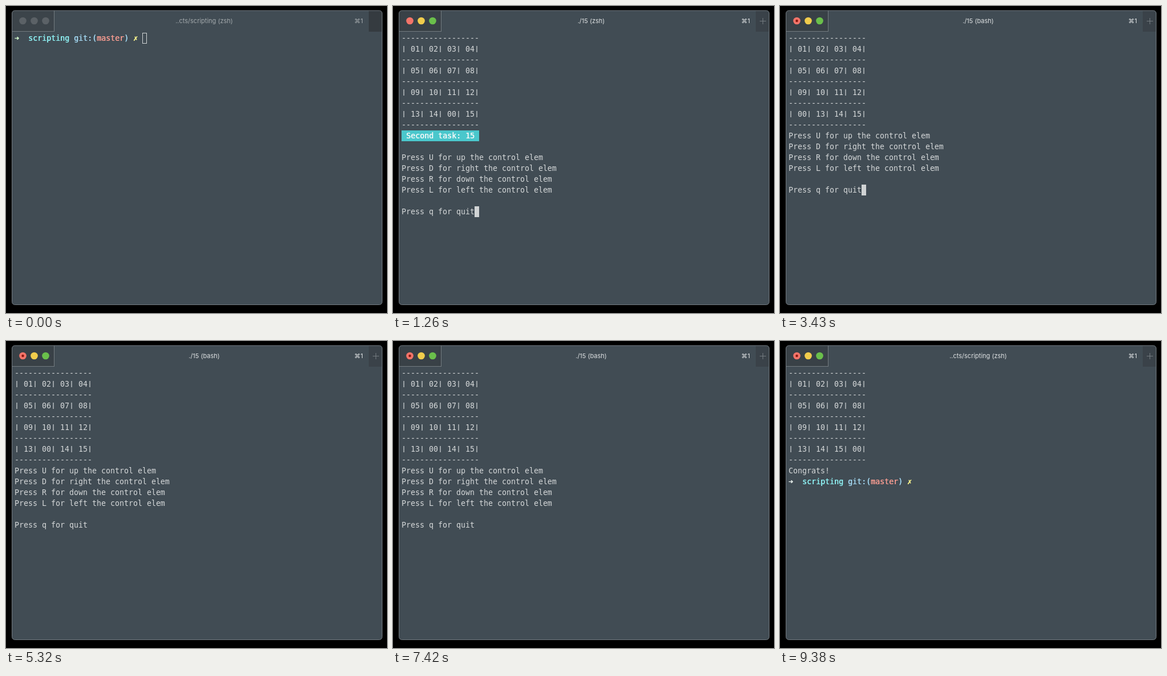
Recreate the animation shown at these times as an HTML page with a canvas. Size 668 by 538 pixels, loop 9450 ms.

```html
<!DOCTYPE html>
<html lang="en">
<head>
<meta charset="utf-8">
<title>Fifteen puzzle in a terminal</title>
<style>
html, body { margin: 0; width: 100%; height: 100%; overflow: hidden; background: #000; }
canvas { display: block; }
</style>
</head>
<body>
<canvas id="stage" width="668" height="538"></canvas>
<script>
const ctx = document.getElementById('stage').getContext('2d');
const LOOP = 9450, CELL = 8, LINE = 19, LEFT = 15, TOP = 47;
const MONO = '13.29px "DejaVu Sans Mono", monospace';
const UI = '11px Inter, sans-serif';
const TEXT = '#d5d8d9', BACK = '#414c54';

const FOCUS = 140, RUN = 1050, BASH = 1330, DONE = 8050, ZSH = 8260;
const CMD = './15', TYPE_START = 420, TYPE_STEP = 140;

// Bottom row of the board from each time on
const MOVES = [
  [RUN, '13 14 00 15'],
  [2100, '13 00 14 15'],
  [3080, '00 13 14 15'],
  [4620, '13 00 14 15'],
  [7700, '13 14 00 15'],
  [7910, '13 14 15 00']
];
const HELP = [
  'Press U for up the control elem',
  'Press D for right the control elem',
  'Press R for down the control elem',
  'Press L for left the control elem',
  '',
  'Press q for quit'
];
const PROMPT = [
  [3, 'scripting', '#8ff3f5'],
  [13, 'git:(', '#a3d8f2'],
  [18, 'master', '#f69b90'],
  [24, ')', '#a3d8f2'],
  [26, '✗', '#f4f08c']
];

const colX = col => LEFT + col * CELL;
const rowY = row => TOP + row * LINE;

function rect(x, y, w, h, color) {
  ctx.fillStyle = color;
  ctx.fillRect(x, y, w, h);
}

function write(col, row, str, color = TEXT, bold = false) {
  ctx.font = MONO;
  ctx.textAlign = 'left';
  ctx.fillStyle = color;
  ctx.fillText(str, colX(col), rowY(row) + 14);
  if (bold) ctx.fillText(str, colX(col) + 0.5, rowY(row) + 14);
}

function cursor(col, row, hollow) {
  if (hollow) {
    ctx.strokeStyle = '#d0d4d5';
    ctx.lineWidth = 1;
    ctx.strokeRect(colX(col) + 0.5, rowY(row) + 0.5, 7, 18);
  } else {
    rect(colX(col), rowY(row), CELL, LINE, '#d0d3d4');
  }
}

function cursorOn(t) {
  if (t < RUN || (t >= 2660 && t < 3780)) return true;
  return (t - 980) % 1120 < 560;
}

function disc(x, y, r, color) {
  ctx.fillStyle = color;
  ctx.beginPath();
  ctx.arc(x, y, r, 0, Math.PI * 2);
  ctx.fill();
}

function title(t) {
  if (t < RUN || t >= ZSH) return '..cts/scripting (zsh)';
  if (t >= DONE) return '..cts/scripting (bash)';
  return t < BASH ? './15 (zsh)' : './15 (bash)';
}

function drawWindow(t) {
  const active = t >= FOCUS;
  rect(0, 0, 668, 538, '#000');
  ctx.beginPath();
  ctx.roundRect(10.5, 8, 649, 515.5, 5);
  ctx.fillStyle = BACK;
  ctx.fill();

  ctx.save();
  ctx.clip();
  rect(10, 8, 75, 37, active ? '#394147' : '#3c444a');
  rect(636, 8, 24, 37, active ? '#3a4249' : '#353b40');
  rect(84, 8, 1, 37, '#737b80');
  rect(10, 44, 75, 1, '#737b80');
  ctx.restore();

  ctx.strokeStyle = '#737b81';
  ctx.lineWidth = 1;
  ctx.stroke();

  const lights = active ? ['#f37469', '#f1cc4c', '#6abf4b'] : Array(3).fill('#5b6166');
  lights.forEach((color, i) => disc(29.5 + 20 * i, 26, 6.3, color));
  if (t >= BASH) disc(29.5, 26, 2.2, '#8d1710');

  ctx.font = UI;
  ctx.fillStyle = active ? '#dfe2e3' : '#a3a9ac';
  ctx.textAlign = 'center';
  ctx.fillText(title(t), 347.5, 30);
  ctx.textAlign = 'right';
  ctx.fillText('⌘1', 626, 30);
  if (active) {
    rect(643, 26, 11, 1, '#747b80');
    rect(648, 21, 1, 11, '#747b80');
  }
}

function drawPrompt(row, t, typed = '') {
  write(0, row, '➜', t < RUN ? '#cdf3c8' : '#e3ebe8', true);
  for (const [col, str, color] of PROMPT) write(col, row, str, color, true);
  write(28, row, typed);
  if (cursorOn(t)) cursor(28 + typed.length, row, t < FOCUS);
}

function drawBoard(t) {
  const last = MOVES.filter(m => t >= m[0]).pop()[1];
  const rows = ['01 02 03 04', '05 06 07 08', '09 10 11 12', last];
  for (let i = 0; i <= 4; i++) write(0, i * 2, '-'.repeat(17));
  rows.forEach((cells, i) => {
    const row = i * 2 + 1;
    cells.split(' ').forEach((n, k) => write(2 + k * 4, row, n));
    for (let k = 0; k <= 4; k++) rect(colX(k * 4) + 3.4, rowY(row) + 4, 1.2, 11, TEXT);
  });
}

function drawHelp(row, t) {
  HELP.forEach((str, i) => write(0, row + i, str));
  if (cursorOn(t)) cursor(16, row + 5);
}

function draw(t) {
  drawWindow(t);
  if (t < RUN) {
    const count = Math.max(0, Math.floor((t - TYPE_START) / TYPE_STEP) + 1);
    drawPrompt(0, t, CMD.slice(0, count));
    return;
  }
  drawBoard(t);
  if (t >= DONE) {
    write(0, 9, 'Congrats!');
    drawPrompt(10, t);
  } else if (t < MOVES[1][0]) {
    rect(LEFT, rowY(9), 17 * CELL, LINE, '#4ac7cc');
    write(1, 9, 'Second task: 15', '#f4f8f8', true);
    drawHelp(11, t);
  } else {
    drawHelp(9, t);
  }
}

const start = performance.now();
function tick() {
  draw((performance.now() - start) % LOOP);
  requestAnimationFrame(tick);
}
tick();
</script>
</body>
</html>
```
